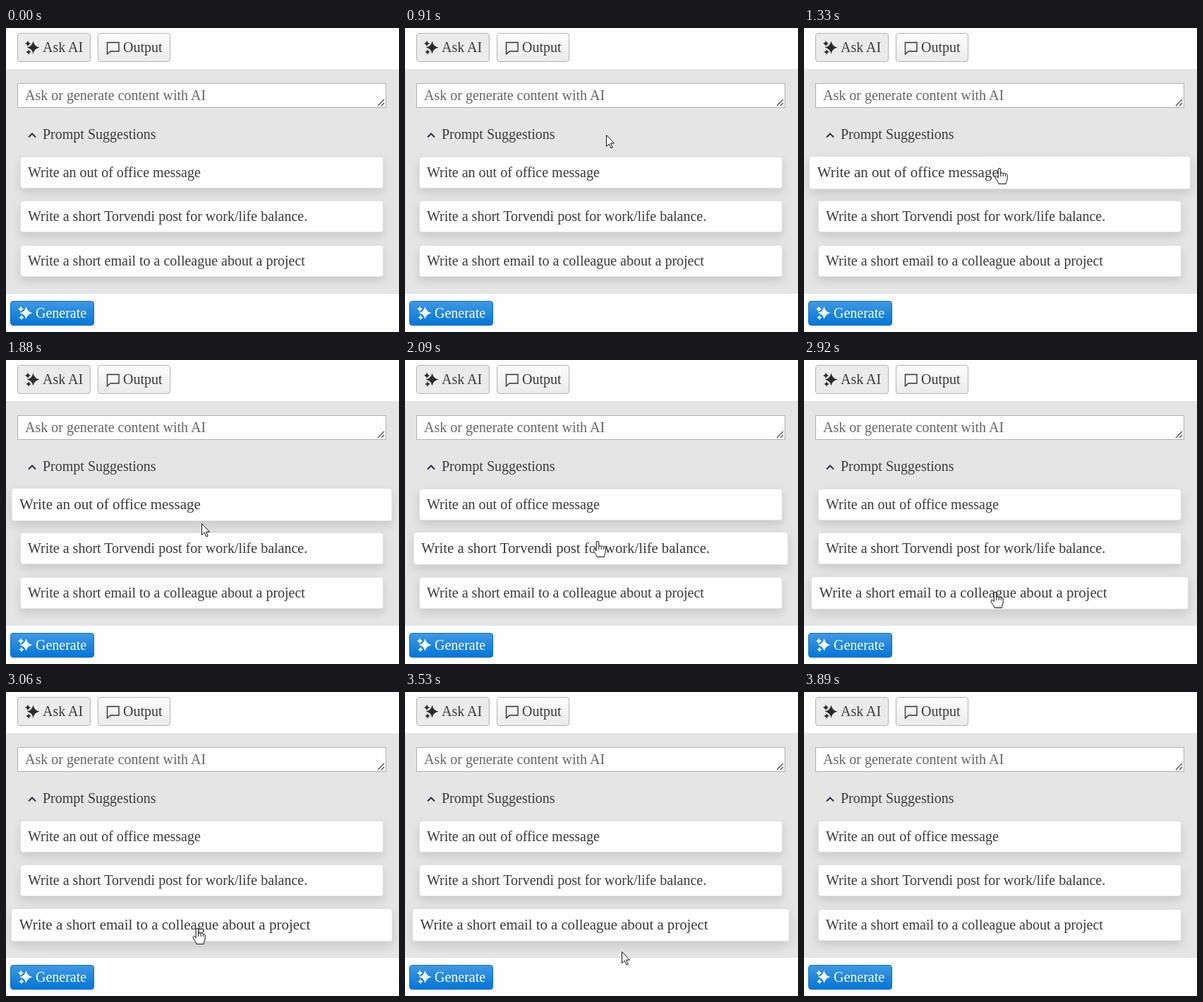
Recreate the animation shown at these times as an HTML page. Size 557 by 430 pixels, loop 4600 ms.

```html
<!DOCTYPE html>
<html lang="en">
<head>
<meta charset="utf-8">
<title>Prompt suggestions</title>
<style>
  html, body { margin: 0; width: 100%; height: 100%; overflow: hidden; background: #fefefe; }
  body { position: relative; font: 20px/22px "Liberation Serif", "Times New Roman", serif; color: #3a3a3a; }
  div, span, svg { position: absolute; box-sizing: border-box; }
  span { white-space: nowrap; }
  .panel { left: 0; top: 58px; width: 100%; height: 318px; background: #e5e5e5; }
  .btn { top: 7px; height: 41px; border: 1px solid #b4b4b4; border-radius: 4px; }
  .ask { left: 16px; width: 104px; background: #ebebeb; }
  .output { left: 130px; width: 103px; background: linear-gradient(#fcfcfc, #ebebeb); }
  .generate { left: 6px; top: 386px; width: 119px; height: 35px; border-color: #0a70c6;
    background: linear-gradient(#3f99e4, #0276d9); }
  .field { left: 16px; top: 78px; width: 523px; height: 35px; border: 1px solid #b0b0b0; background: #fefefe; }
  .card { left: 20px; width: 515px; height: 45px; border: 1px solid #e2e2e2; border-radius: 4px;
    background: #fefefe; box-shadow: 0 6px 14px rgba(0, 0, 0, .13); }
  .card span { left: 10px; top: 10px; }
  svg { left: 0; top: 0; width: 557px; height: 430px; }
</style>
</head>
<body>
<div class="panel"></div>
<div class="btn ask"></div>
<div class="btn output"></div>
<div class="btn generate"></div>
<div class="field"></div>

<span style="left:52px;top:16px">Ask AI</span>
<span style="left:166px;top:16px">Output</span>
<span style="left:27px;top:84px;color:#666">Ask or generate content with AI</span>
<span style="left:52px;top:139px">Prompt Suggestions</span>
<span style="left:42px;top:392px;color:#fff">Generate</span>

<div class="card" style="top:182px"><span>Write an out of office message</span></div>
<div class="card" style="top:244px"><span>Write a short Torvendi post for work/life balance.</span></div>
<div class="card" style="top:307px"><span>Write a short email to a colleague about a project</span></div>

<svg viewBox="0 0 557 430" fill="none">
  <defs>
    <path id="star" d="M0-9Q1.5-1.5 9 0Q1.5 1.5 0 9Q-1.5 1.5-9 0Q-1.5-1.5 0-9z"/>
    <g id="sparkles">
      <use href="#star" x="12" y="9.5"/>
      <use href="#star" transform="translate(4.5 4) scale(.5)"/>
      <use href="#star" transform="translate(5.5 16) scale(.45)"/>
    </g>
  </defs>
  <use href="#sparkles" x="26.5" y="18" fill="#2b2b2b"/>
  <use href="#sparkles" x="16.5" y="393.5" fill="#fff"/>
  <path d="M143.5 20.5h16.5v12.5h-12l-4.5 4z" stroke="#333" stroke-width="1.4"/>
  <path d="M32 154.5l5-5 5 5" stroke="#27324a" stroke-width="2"/>
  <path d="M527 110l9-9M532 110l4-4" stroke="#444" stroke-width="1.2"/>
  <g id="cursor" fill="#fff" stroke="#111" stroke-linejoin="round">
    <path id="arrow" d="M.5.5v16l3.7-3.5 2.8 6 2.3-1-2.8-6h5z"/>
    <path id="hand" d="M-1.8 14V2.2a1.8 1.8 0 0 1 3.6 0V8c0-1.8 3.2-1.8 3.4.3.3-1.6 3.2-1.4 3.2.6.3-1.3 2.8-1.1 2.8 1V15c0 2.5-2 4-2 7.5H-1c0-3-4.8-6.5-4.9-10 0-2 2.5-1.6 4.1 1.5zM1.8 8v4M5.2 8.5V12M8.4 9.2V12"/>
  </g>
</svg>

<script>
const LOOP = 4600, STEP = 70, FADE = 200, GROW = .05;
const starts = [0, 440, 910, 1600, 2380, 2850, 3390, 3890];
const hovers = [[1120, 1870], [2015, 2740], [2825, 3495]];
// time, x, y of the pointer
const path = [
  [440, 513, 69], [580, 430, 92], [720, 345, 122], [910, 285, 151],
  [1120, 279, 183], [1400, 276, 203], [1600, 276, 204], [1880, 277, 231],
  [2020, 274, 252], [2230, 271, 265], [2380, 271, 265], [2590, 271, 273],
  [2720, 271, 292], [2920, 271, 328], [3060, 271, 334], [3390, 271, 334],
  [3530, 307, 367], [3890, 350, 428]
];
const $ = id => document.getElementById(id);
const cards = document.querySelectorAll('.card');
const clamp = v => Math.max(0, Math.min(1, v));
const bez = (u, a, b) => 3 * u * (1 - u) ** 2 * a + 3 * u * u * (1 - u) * b + u ** 3;

// cubic-bezier(.25, .1, .25, 1)
function ease(p) {
  let lo = 0, hi = 1;
  for (let i = 0; i < 20; i++) {
    const mid = (lo + hi) / 2;
    if (bez(mid, .25, .25) < p) lo = mid; else hi = mid;
  }
  return bez(lo, .1, 1);
}

function snap(t) {
  const s = starts.filter(v => v <= t).pop();
  return s + Math.floor((t - s) / STEP) * STEP;
}

function pointAt(t) {
  const i = path.findIndex(p => p[0] > t);
  const [t0, x0, y0] = path[i - 1], [t1, x1, y1] = path[i];
  const k = (t - t0) / (t1 - t0);
  return [x0 + (x1 - x0) * k, y0 + (y1 - y0) * k].map(Math.round);
}

function draw(t) {
  hovers.forEach(([on, off], i) => {
    const k = ease(clamp((t - on) / FADE)) - ease(clamp((t - off) / FADE));
    cards[i].style.transform = k > .001 ? `scale(${1 + GROW * k})` : 'none';
  });
  const visible = t >= 440 && t < 3890;
  const over = hovers.some(([on, off]) => t >= on && t < off);
  $('cursor').style.display = visible ? '' : 'none';
  $('arrow').style.display = over ? 'none' : '';
  $('hand').style.display = over ? '' : 'none';
  if (visible) $('cursor').setAttribute('transform', `translate(${pointAt(t)})`);
}

const begin = performance.now();
function tick() {
  draw(snap((performance.now() - begin) % LOOP));
  requestAnimationFrame(tick);
}
tick();
</script>
</body>
</html>
```
